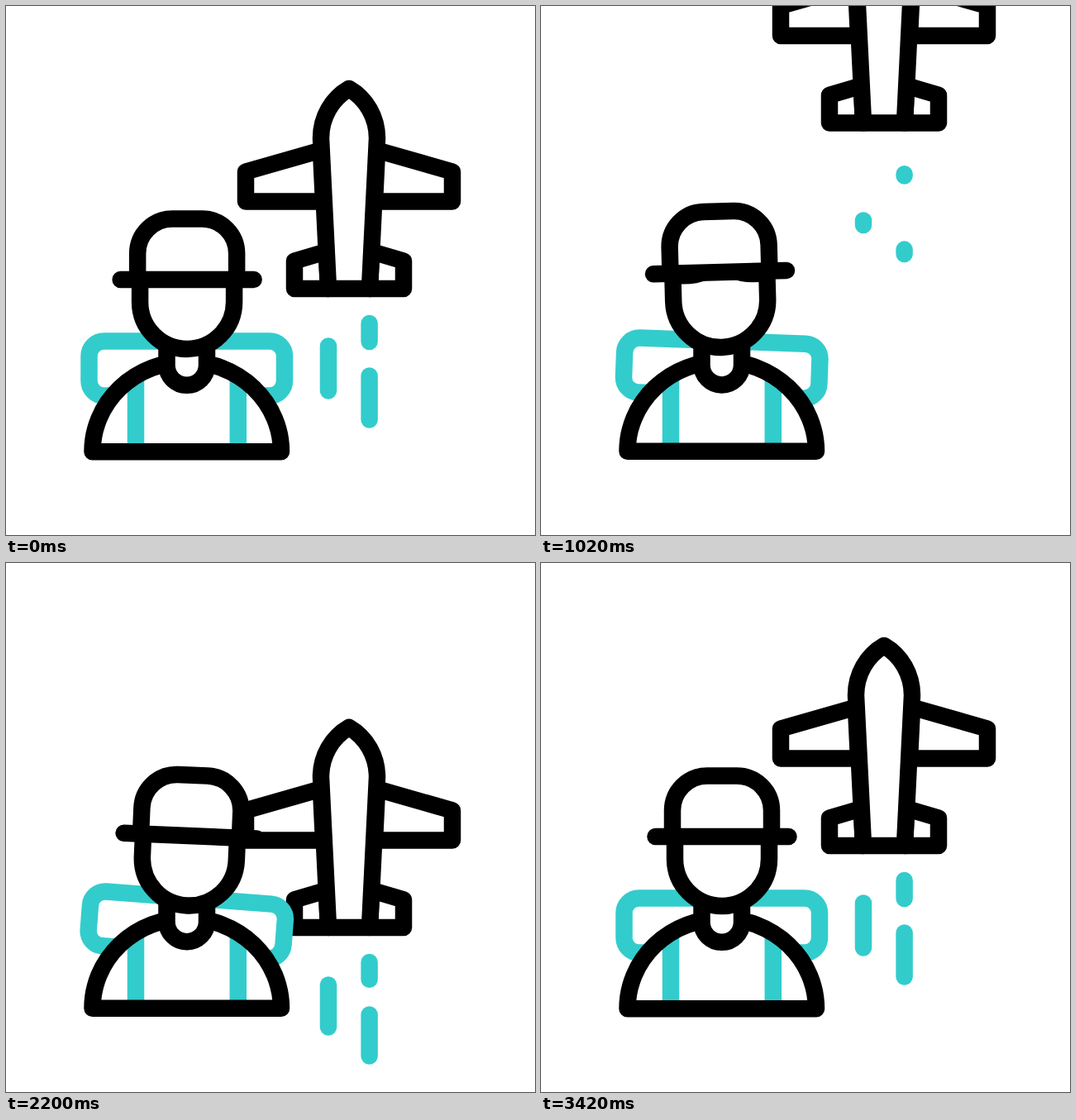
Recreate the animation shown at these times as an HTML page. Size 640 by 640 pixels, loop 3.6 s.

```html
<!DOCTYPE html>
<html lang="en">
<head>
<meta charset="utf-8">
<title>Traveller and plane</title>
<style>
  html, body { margin: 0; width: 100%; height: 100%; overflow: hidden; background: #fff; }
  svg { display: block; width: 100%; height: 100%; }
  path { fill: #fff; stroke: #000; stroke-width: 20.5; stroke-linecap: round; stroke-linejoin: round; }
  .teal { stroke: #3cc; }
  .line { fill: none; }
  .fill { stroke: none; }
  .butt { stroke-linecap: butt; }
</style>
</head>
<body>
<svg viewBox="0 0 640 640">
  <defs>
    <g id="side">
      <path d="M384 236.5H290V200.5L381 174.5Z"/>
      <path d="M390 342H349V308.5L388 297Z"/>
    </g>
  </defs>
  <g id="plane">
    <use href="#side"/>
    <use href="#side" transform="translate(830 0) scale(-1 1)"/>
    <path d="M415 100C394 112 381 135 381 160L390 342H440L449 160C449 135 436 112 415 100Z"/>
    <path class="teal line trail" data-x="390" data-top="411.5" data-len="54"/>
    <path class="teal line trail" data-x="439.6" data-top="384" data-len="22"/>
    <path class="teal line trail" data-x="439.6" data-top="447.5" data-len="53"/>
  </g>
  <g id="body">
    <path id="pack" class="teal" d="M118.5 405.5H319a18 18 0 0 1 18 18V453.5a18 18 0 0 1-18 18H118.5a18 18 0 0 1-18-18V423.5a18 18 0 0 1 18-18Z"/>
    <path class="fill" d="M104.5 539.2A114.25 109 0 0 1 333 539.2Z"/>
    <path class="teal line butt" d="M157 448V535M280.8 448V535"/>
    <path class="line" d="M104.5 539.2A114.25 109 0 0 1 333 539.2Z"/>
    <path class="butt" d="M194.5 402V434.5a24.25 24.25 0 0 0 48.5 0V402"/>
    <g id="head">
      <g id="face">
        <path d="M162 316V358a57 57 0 0 0 114 0V316"/>
        <path class="line" d="M162 326C188 330 207 324 219 309C231 324 250 330 276 326"/>
      </g>
      <g id="hat">
        <path d="M159 331V299.5a42 42 0 0 1 42-42H237a42 42 0 0 1 42 42V331"/>
        <path class="line" d="M138.5 331H299.5"/>
      </g>
    </g>
  </g>
</svg>
<script>
const LOOP = 3600, END = 3420, REST = 3300, EXIT = 1500, BEAT = 1050;
const $ = id => document.getElementById(id);
const trails = document.querySelectorAll(".trail");
const move = (id, value) => $(id).setAttribute("transform", value);

// Smooth step from 0 to 1 between two times
function ease(t, from, to) {
  const u = Math.min(1, Math.max(0, (t - from) / (to - from)));
  return u * u * (3 - 2 * u);
}

// Three hops; a later part follows with a lag
function hop(t, lag) {
  const u = (t - lag) / BEAT;
  return u > 0 && u < 3 ? Math.sin(Math.PI * u) ** 2 : 0;
}

const swing = (t, period) => Math.sin(2 * Math.PI * t / period);

function drawPlane(t) {
  const leaving = t < EXIT;
  const y = leaving
    ? 50.5 * ease(t, 0, 560) - 517 * ease(t, 560, EXIT)
    : 270 * (Math.max(0, END - t) / 1520) ** 4.55;
  move("plane", `translate(0 ${y})`);

  // Trails shrink from the top on the way out and grow downwards on return
  const keep = leaving ? 1 - 0.9 * ease(t, 0, 1000) : 0.1 + 0.9 * ease(t, 1640, 2300);
  for (const el of trails) {
    const { x, top, len } = el.dataset;
    const now = len * keep;
    el.setAttribute("d", `M${x} ${leaving ? +top + (len - now) : top}v${now}`);
  }
}

function drawTraveller(t) {
  const left = Math.max(0, 1 - t / REST);
  const settle = Math.max(0, 1 - (t / REST) ** 8);
  const turn = `rotate(${12.9 * left * swing(t, BEAT)} 219 425)`;
  const hatLift = 34.5 * (1 - t / 4400) * hop(t, 150);

  move("body", `translate(0 ${-12 * hop(t, 30)})`);
  move("pack", `rotate(${4.8 * settle * swing(t, 955)} 218.75 438.5)`);
  move("head", `translate(0 ${-12 * hop(t, 100)})`);
  move("face", turn);
  move("hat", `translate(0 ${-hatLift}) ${turn}`);
}

function draw(t) {
  drawPlane(t);
  drawTraveller(t);
}

const start = performance.now();
function tick() {
  draw((performance.now() - start) % LOOP);
  requestAnimationFrame(tick);
}
draw(0);
requestAnimationFrame(tick);
</script>
</body>
</html>
```
